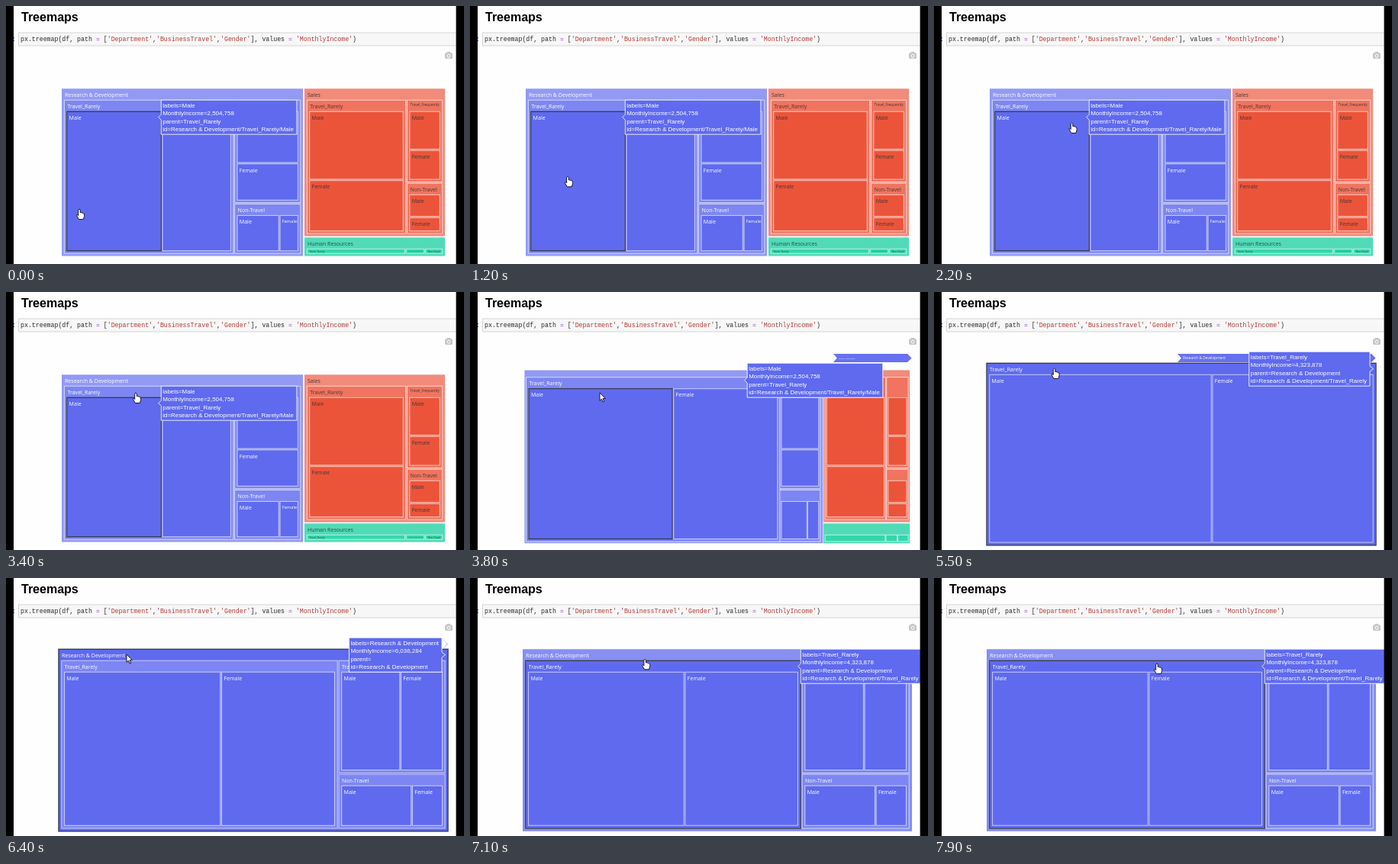
Write an HTML page with a canvas that moves like this. It is 600 by 338 pixels and loops after 8 s.

```html
<!DOCTYPE html>
<html lang="en">
<head>
<meta charset="utf-8">
<title>Treemaps</title>
<style>
html, body { margin: 0; width: 100%; height: 100%; overflow: hidden; background: #fff; }
canvas { display: block; width: 600px; height: 338px; }
</style>
</head>
<body>
<canvas id="stage"></canvas>
<script>
const LOOP = 8000, ZOOM_IN = 3457, ZOOM_OUT = 5740, ZOOM_TIME = 750;
const SANS = '"Liberation Sans", Arial, sans-serif';
const LABEL = '"Open Sans", sans-serif';
const MONO = '"Liberation Mono", "Courier New", monospace';
const BLUE = [95, 106, 239], RED = [236, 84, 58], GREEN = [30, 209, 162];

const canvas = document.getElementById('stage');
const ctx = canvas.getContext('2d');
const dpr = window.devicePixelRatio || 1;
canvas.width = 600 * dpr;
canvas.height = 338 * dpr;

// ---- tree ----
const node = (name, value, kids) => ({ name, value, kids });
const genders = male => [node('Male', male), node('Female', 1 - male)];
const travel = (rare, often, none, m1, m2, m3) => [
  node('Travel_Rarely', rare, genders(m1)),
  node('Travel_Frequently', often, genders(m2)),
  node('Non-Travel', none, genders(m3))
];
const research = node('Research & Development', 63.2, travel(.72, .189, .091, .58, .585, .7));
const sales = node('Sales', 32.7, travel(.737, .163, .1, .573, .566, .62));
const human = node('Human Resources', 4.1, [
  node('Travel_Rarely', .73), node('Travel_Frequently', .14), node('Non-Travel', .13)
]);
const rarely = research.kids[0], male = rarely.kids[0];
const nodes = [];

function register(n, depth, color) {
  n.depth = depth;
  n.color = color;
  nodes.push(n);
  (n.kids || []).forEach(k => register(k, depth + 1, color));
}
register(research, 1, BLUE);
register(sales, 1, RED);
register(human, 1, GREEN);

// ---- layout: rect = [x0, y0, x1, y1] ----
const GAP = 1.8;

function split(list, rect, pad, map) {
  const [head, ...rest] = list;
  if (!rest.length) return place(head, rect, pad, map);
  const total = list.reduce((sum, n) => sum + n.value, 0);
  const axis = rect[2] - rect[0] >= rect[3] - rect[1] ? 0 : 1;
  const cut = rect[axis] + (rect[axis + 2] - rect[axis] - GAP) * head.value / total;
  const a = rect.slice(), b = rect.slice();
  a[axis + 2] = cut;
  b[axis] = cut + GAP;
  place(head, a, pad, map);
  split(rest, b, pad, map);
}

function place(n, rect, pad, map) {
  map.set(n, rect);
  if (n.kids) {
    const [x0, y0, x1, y1] = rect;
    split(n.kids, [x0 + pad, y0 + 15, x1 - pad, y1 - pad], pad, map);
  }
}

const ZOOMED = [69, 93.3, 579, 331.8];
const overview = new Map(), detail = new Map(), branch = new Map();
split([research, sales, human], [73, 108.3, 575, 327.5], 3.4, overview);
place(rarely, ZOOMED, 3.8, detail);
place(research, ZOOMED, 3.8, branch);

// Sectors outside a view are squeezed against the right edge.
function squeeze(n, [, y0, , y1]) {
  const x = n.color === BLUE ? 575 : 578;
  return [x, n.kids && y0 < 130 ? 93 : y0, x, y1 > 318 ? Math.min(332, y1 + 7) : y1];
}

function rectIn(view, other, n) {
  if (view.has(n)) return view.get(n);
  if (n === research) return ZOOMED;
  return squeeze(n, other.get(n) || overview.get(n));
}

// ---- timing ----
const clamp = v => Math.max(0, Math.min(1, v));
const mix = (a, b, p) => a + (b - a) * p;
const cubic = t => t < .5 ? 4 * t ** 3 : 1 - 4 * (1 - t) ** 3;
const zoom = (t, start) => cubic(clamp((t - start) / ZOOM_TIME));
const zooming = t => [ZOOM_IN, ZOOM_OUT].some(s => t >= s && t < s + ZOOM_TIME);

const mousePath = [
  [0, 96, 266], [700, 96, 266], [1900, 180.5, 153], [2500, 180.5, 153],
  [3300, 170, 132], [4600, 170, 132], [5300, 157.5, 100], [6450, 158, 100],
  [7700, 292, 112], [LOOP, 292, 112]
];

function mouseAt(t) {
  const i = Math.max(1, mousePath.findIndex(k => k[0] > t));
  const a = mousePath[i - 1], b = mousePath[i];
  const u = clamp((t - a[0]) / (b[0] - a[0])), p = u * u * (3 - 2 * u);
  return [mix(a[1], b[1], p), mix(a[2], b[2], p)];
}

function hoverAt(t) {
  if (t < 5050) return male;
  return t >= 6250 && t < 7050 ? research : rarely;
}

const tips = new Map([
  [male, ['labels=Male', 'MonthlyIncome=2,504,758', 'parent=Travel_Rarely',
    'id=Research & Development/Travel_Rarely/Male']],
  [rarely, ['labels=Travel_Rarely', 'MonthlyIncome=4,323,878',
    'parent=Research & Development', 'id=Research & Development/Travel_Rarely']],
  [research, ['labels=Research & Development', 'MonthlyIncome=6,036,284',
    'parent=', 'id=Research & Development']]
]);

// ---- drawing ----
const tint = (color, a) => `rgb(${color.map(c => Math.round(255 + (c - 255) * a))})`;

function text(str, x, y, font, color) {
  ctx.font = font;
  ctx.fillStyle = color;
  ctx.fillText(str, x, y);
}

function polygon(points, fill, stroke, width = 1) {
  ctx.beginPath();
  points.forEach(([x, y]) => ctx.lineTo(x, y));
  ctx.closePath();
  if (fill) { ctx.fillStyle = fill; ctx.fill(); }
  if (stroke) { ctx.strokeStyle = stroke; ctx.lineWidth = width; ctx.stroke(); }
}

function outline([x0, y0, x1, y1], color, width) {
  ctx.strokeStyle = color;
  ctx.lineWidth = width;
  ctx.strokeRect(x0, y0, x1 - x0, y1 - y0);
}

function drawPage() {
  ctx.fillStyle = '#fefefe';
  ctx.fillRect(0, 0, 600, 338);
  text('Treemaps', 20, 20.3, `bold 16px ${SANS}`, '#000');
  ctx.fillStyle = '#f7f7f7';
  ctx.fillRect(16, 35, 580, 17);
  outline([16.5, 35, 596, 52], '#d6d6d6', 1);
  text(':', 8, 46, `8.24px ${MONO}`, '#303f9f');

  const code = "px.treemap(df, path = ['Department','BusinessTravel','Gender'], values = 'MonthlyIncome')";
  let x = 19;
  for (const part of code.split(/('[^']*'|=)/)) {
    const color = part === '=' ? '#9a4fc8' : part[0] === "'" ? '#b33a36' : '#2a2a2a';
    text(part, x, 46, `8.24px ${MONO}`, color);
    x += part.length * 4.944;
  }

  ctx.fillStyle = '#c4c6c8';
  ctx.beginPath();
  ctx.roundRect(575, 61.5, 10, 7.5, 1.2);
  ctx.roundRect(577.5, 60, 5, 3, .8);
  ctx.fill();
  ctx.lineWidth = 1;
  ctx.strokeStyle = '#fff';
  ctx.beginPath();
  ctx.arc(580, 65.3, 2.1, 0, 7);
  ctx.stroke();
}

function drawLabel(n, [x0, y0, x1, y1]) {
  const w = x1 - x0, h = y1 - y0;
  ctx.font = `7.05px ${LABEL}`;
  const room = w - (n.kids ? 8 : 4);
  const s = Math.min(1, room / ctx.measureText(n.name).width, (h - 2.5) / 7);
  if (s < .2) return;
  const dx = n.kids ? 4 : 2.8;
  const top = h < 10 ? .8 : 2.8;
  const dark = n.color === RED ? '#4a3533' : '#2f4a44';
  text(n.name, x0 + dx, y0 + top + (n.kids ? 7.6 : 7.9) * s,
    `${7.05 * s}px ${LABEL}`, n.color === BLUE ? '#fff' : dark);
}

function drawTree(from, to, p, hover) {
  let ring;
  for (const n of nodes) {
    const a = rectIn(from, to, n), b = rectIn(to, from, n);
    const r = a.map((v, i) => mix(v, b[i], p));
    const w = r[2] - r[0], h = r[3] - r[1];
    if (n === hover) ring = r;
    if (w < 1) continue;
    const fade = n.depth === 1 ? (to === branch ? .75 : .68) : .81;
    ctx.fillStyle = tint(n.color, n === hover || !n.kids ? 1 : fade);
    if (n.color === GREEN) ctx.fillStyle = tint(GREEN, n.kids ? .78 : .9);
    ctx.fillRect(r[0], r[1], w, h);
    if (n.depth > 1) outline(r, 'rgba(255,255,255,.64)', 1);
    if (to.has(n)) drawLabel(n, r);
  }
  if (ring) outline(ring, '#363a55', 1.4);
}

function drawCrumb(p) {
  if (p < .002) return;
  const x = mix(574.5, 319, p);
  polygon([[x, 81], [573, 81], [578.5, 86.5], [573, 92], [x, 92], [x + 5, 86.5]], tint(BLUE, .95));
  text(research.name, x + 7, 88.3, `${4.75 * p}px ${LABEL}`, '#fff');
}

function drawTip(lines, [, y0, x1]) {
  const font = `7.93px ${SANS}`;
  ctx.font = font;
  const w = Math.max(...lines.map(s => ctx.measureText(s).width)) + 6;
  const flip = x1 + w > 600;
  const tip = x1 - 3.5, y = y0 + 7.4;
  const near = flip ? tip - 4.5 : tip + 3.5;
  const far = flip ? near - w : near + w;
  polygon([[tip, y], [near, y - 3.5], [near, y - 22.5], [far, y - 22.5],
    [far, y + 22.5], [near, y + 22.5], [near, y + 3.5]], tint(BLUE, 1), 'rgba(255,255,255,.85)');
  lines.forEach((s, i) => text(s, Math.min(near, far) + 2, y - 12.9 + i * 10.4, font, '#fff'));
}

const hand = new Path2D('M-1.3 1Q0-.8 1.3 1V4.6Q2.6 4 3.4 5Q4.6 4.6 5.2 5.7' +
  'Q6.6 5.6 6.6 7V9.5L5.3 13.5H-.6L-3.2 9Q-4 7.2-2.6 7.2L-1.3 8.6Z');
const arrow = new Path2D('M0 0V10.4L2.4 8.2L4 12L5.7 11.3L4.1 7.6H7.3Z');

function drawMouse(t) {
  const [x, y] = mouseAt(t);
  const shape = zooming(t) ? arrow : hand;
  ctx.save();
  ctx.translate(x, y);
  ctx.lineJoin = 'round';
  ctx.lineWidth = 1;
  ctx.fillStyle = '#fff';
  ctx.strokeStyle = '#16182c';
  ctx.fill(shape);
  ctx.stroke(shape);
  ctx.restore();
}

function draw(t) {
  const out = t >= ZOOM_OUT;
  const from = out ? detail : overview;
  const to = out ? branch : t >= ZOOM_IN ? detail : overview;
  const p = zoom(t, out ? ZOOM_OUT : ZOOM_IN);
  const hover = hoverAt(t);
  ctx.setTransform(dpr, 0, 0, dpr, 0, 0);
  drawPage();
  drawTree(from, to, p, hover);
  drawCrumb(out ? 1 - p : p);
  drawTip(tips.get(hover), to.get(hover));
  drawMouse(t);
  ctx.fillStyle = '#000';
  ctx.fillRect(0, 0, 10, 338);
  ctx.fillRect(589.6, 0, 11, 338);
}

const begin = performance.now();
function frame() {
  draw((performance.now() - begin) % LOOP);
  requestAnimationFrame(frame);
}
frame();
</script>
</body>
</html>
```
